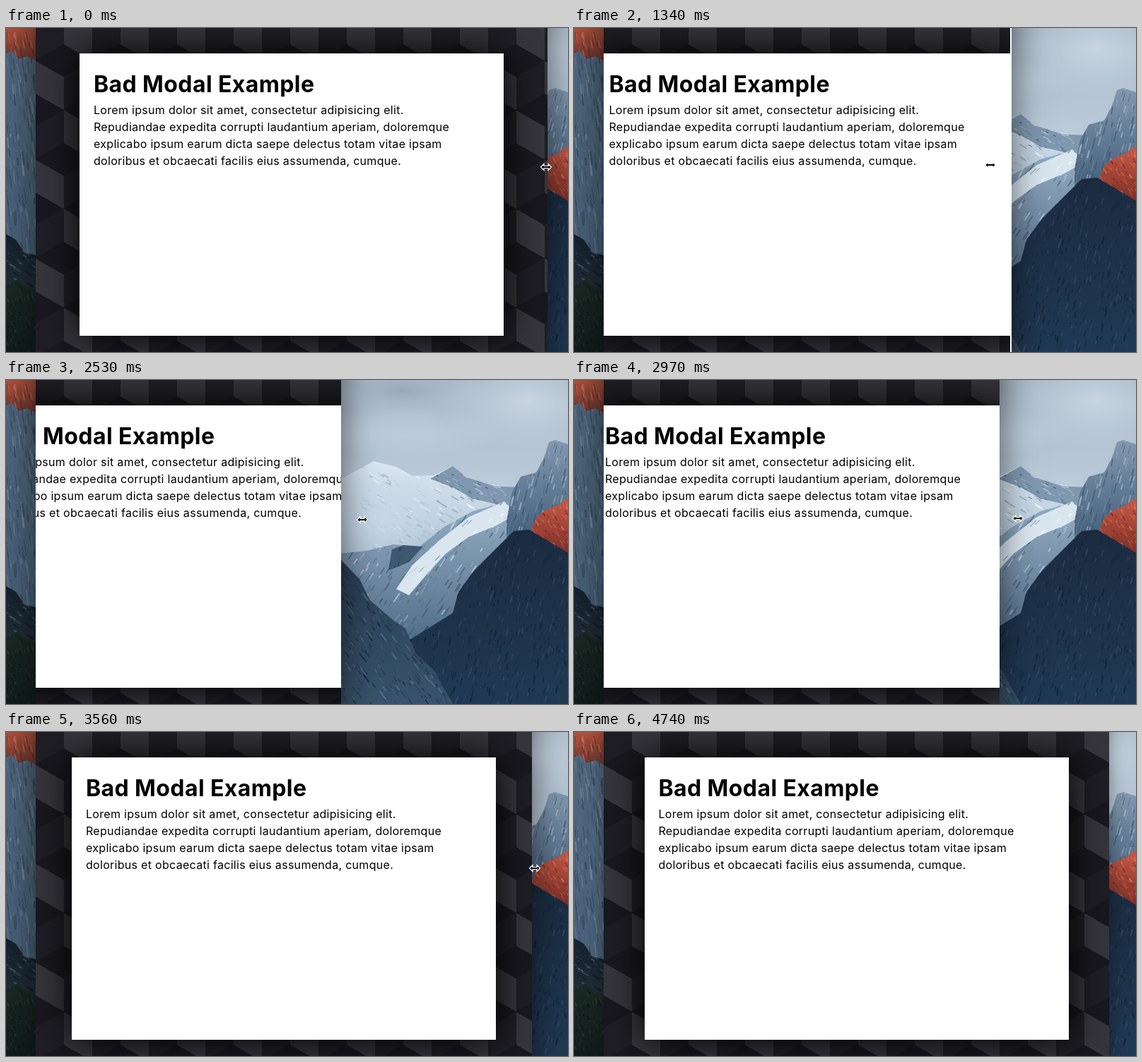
Recreate the animation shown at these times as an HTML page with a canvas. Size 795x459 px, loop 4840 ms.

```html
<!DOCTYPE html>
<html lang="en">
<head>
<meta charset="utf-8">
<title>Modal resize</title>
<style>
  html, body { margin: 0; width: 100%; height: 100%; overflow: hidden; background: #1c2a3a; }
  #stage { position: relative; width: 795px; height: 459px; overflow: hidden; }
  #scene, #cursor { position: absolute; left: 0; top: 0; }
  #win {
    position: absolute; left: 42px; top: -100px; height: 659px;
    box-shadow: 0 14px 48px rgba(0, 0, 0, .6);
  }
  #win.idle { box-shadow: 0 8px 24px rgba(0, 0, 0, .4); }
  #view { position: absolute; inset: 0; overflow: hidden; background: #fff; }
  #page {
    --edge: #445 12%, transparent 12.5%, transparent 87%, #445 87.5%, #445;
    --face: #99a 25%, transparent 25.5%, transparent 75%, #99a 75%, #99a;
    position: absolute; left: 0; top: 100px; height: 459px; overflow: hidden;
    background-color: #556;
    background-image:
      linear-gradient(rgba(0, 0, 0, .65), rgba(0, 0, 0, .65)),
      linear-gradient(30deg, var(--edge)), linear-gradient(150deg, var(--edge)),
      linear-gradient(30deg, var(--edge)), linear-gradient(150deg, var(--edge)),
      linear-gradient(60deg, var(--face)), linear-gradient(60deg, var(--face));
    background-size: 80px 140px;
    background-position: 0 -24px, 0 -24px, 0 -24px, 40px 46px, 40px 46px, 0 -24px, 40px 46px;
  }
  #modal {
    position: absolute; left: 50%; top: 36px; width: 600px; height: 400px; margin-left: -300px;
    background: #fff; color: #000; box-shadow: 0 0 50px #000;
    font: 16px/24px Inter, sans-serif; white-space: nowrap;
  }
  h1, p { position: absolute; left: 20px; margin: 0; }
  h1 { top: 24px; font-size: 32px; line-height: 40px; font-weight: 700; letter-spacing: .4px; }
  p { top: 68px; letter-spacing: .3px; }
</style>
</head>
<body>
<div id="stage">
  <canvas id="scene" width="795" height="459"></canvas>
  <div id="win">
    <div id="view">
      <div id="page">
        <div id="modal">
          <h1>Bad Modal Example</h1>
          <p>Lorem ipsum dolor sit amet, consectetur adipisicing elit.<br>
          Repudiandae expedita corrupti laudantium aperiam, doloremque<br>
          explicabo ipsum earum dicta saepe delectus totam vitae ipsam<br>
          doloribus et obcaecati facilis eius assumenda, cumque.</p>
        </div>
      </div>
    </div>
  </div>
  <svg id="cursor" width="18" height="12" viewBox="-9 -6 18 12">
    <path d="M-7.5 0L-3 -4.5V-1.5H3V-4.5L7.5 0L3 4.5V1.5H-3V4.5Z" stroke="#fff" stroke-width="1.2"/>
  </svg>
</div>
<script>
const $ = id => document.getElementById(id);
const g = $('scene').getContext('2d');

let seed = 11;
const rnd = () => (seed = seed * 16807 % 2147483647) / 2147483647;

function fade(y0, y1, top, bottom) {
  const f = g.createLinearGradient(0, y0, 0, y1);
  f.addColorStop(0, top);
  f.addColorStop(1, bottom);
  return f;
}

// Fills a path, then scatters short slanted strokes inside it.
function land(d, fill, box, colors = [], count = 0, dx = 4, dy = 8) {
  const path = new Path2D(d), [x, y, w, h] = box;
  g.save();
  g.fillStyle = fill;
  g.fill(path);
  g.clip(path);
  for (let i = 0; i < count; i++) {
    const px = x + rnd() * w, py = y + rnd() * h, k = .4 + rnd();
    g.strokeStyle = colors[i % colors.length];
    g.lineWidth = .6 + rnd() * 1.6;
    g.globalAlpha = .25 + rnd() * .45;
    g.beginPath();
    g.moveTo(px, py);
    g.lineTo(px + dx * k, py + dy * k);
    g.stroke();
  }
  g.restore();
}

function cloud(x, y, rx, ry, color) {
  g.save();
  g.translate(x, y);
  g.scale(rx, ry);
  const f = g.createRadialGradient(0, 0, 0, 0, 0, 1);
  f.addColorStop(0, color);
  f.addColorStop(1, 'rgba(200,215,228,0)');
  g.fillStyle = f;
  g.fillRect(-1, -1, 2, 2);
  g.restore();
}

function drawScene() {
  // Sky
  g.fillStyle = fade(0, 200, '#a5b5c4', '#c3d3e1');
  g.fillRect(0, 0, 795, 459);
  cloud(740, 30, 130, 70, 'rgba(208,220,230,.8)');
  cloud(560, 75, 150, 35, 'rgba(190,205,219,.8)');
  cloud(560, 15, 120, 40, 'rgba(135,153,172,.5)');

  // Snow range
  land('M430 150L478 138L520 115L552 123L575 136L605 135L632 122L652 138L680 147L722 153V330H430Z',
    fade(115, 300, '#dbe7f1', '#9db5ca'), [500, 120, 230, 120], ['#5c7893', '#fff', '#87a0b8'], 200, 8, 5);
  land('M600 140L632 122L652 138L690 150L722 152V190L690 175L660 168L632 152Z',
    '#7f98b0', [600, 122, 122, 70], ['#35516d', '#e4eef6'], 110, 7, 4);
  cloud(530, 190, 95, 65, 'rgba(200,216,230,.95)');

  // Granite slopes
  land('M430 250L510 242L548 233L585 236L620 208L660 186L690 178L722 190V330L570 380L430 300Z',
    fade(190, 365, '#8fa8bf', '#546f8a'), [430, 185, 290, 185], ['#2d4661', '#dbe7f1', '#456079'], 420, -6, 9);
  land('M552 296L575 262L612 228L655 194L705 172L722 190L694 206L655 222L622 246L598 272L570 305Z',
    '#d9e6f0', [550, 172, 172, 130], ['#fff', '#6d879f', '#3c5772'], 110, -8, 8);
  land('M541 270L546 240L562 234L590 236L570 258Z', '#3f5870', [540, 232, 50, 40], ['#253d56'], 20, -2, 9);

  // Dome
  land('M708 200L716 158L728 137L750 131L762 108L768 88L777 85L795 91V225H708Z',
    fade(85, 210, '#8299af', '#4a6580'), [708, 86, 87, 130], ['#314c67', '#b9cad8', '#6a839b'], 150, -3, 12);

  // Sunlit hill
  land('M738 225L750 195L764 184L780 178L795 167V255H738Z',
    fade(168, 245, '#c85a45', '#7d2f28'), [738, 168, 57, 80], ['#e58468', '#732a28', '#b34a3a'], 140, 4, 5);

  // Dark forest
  land('M560 375L600 350L632 330L640 300L662 270L690 242L718 214L740 212L764 226L795 245V459H560Z',
    fade(215, 459, '#1b2c40', '#203953'), [560, 212, 235, 247], ['#0d1a2a', '#35506b', '#14253a'], 620, -2, 8);

  // Near ridge
  land('M430 225L474 255L500 282L515 312L545 338L565 352L580 388L606 412L632 459H430Z',
    fade(260, 459, '#2a3f55', '#38536b'), [430, 225, 202, 234], ['#101e2e', '#6a859c', '#1a2c40'], 420, 6, 8);

  // Left cliff
  land('M0 0H42V459H0Z', fade(30, 310, '#50667d', '#4a627a'),
    [0, 30, 42, 290], ['#25384c', '#7d93a8', '#384e65'], 150, 2, 18);
  land('M0 0H42V46L30 40L18 44L8 32L0 36Z', fade(0, 45, '#b0523c', '#6d3631'),
    [0, 0, 42, 45], ['#d27a58', '#55292a', '#8e4034'], 50, 2, 9);
  land('M0 292L14 300L26 318L42 322V459H0Z', fade(295, 380, '#16232f', '#222f38'),
    [0, 292, 42, 80], ['#5d7488', '#0b141d'], 50, 8, 5);
  land('M0 366L16 356L30 368L42 372V459H0Z', fade(356, 459, '#1b2a25', '#121d1b'),
    [0, 356, 42, 103], ['#2f4032', '#0a1211'], 80, 2, 5);
}

// step, window edge, layout edge, cursor x, cursor y
const poses = [
  [0, 766, 766, 764, 197],
  [1, 755, 755, 740, 197],
  [3, 695, 696, 660, 197],
  [8, 505, 498, 482, 190],
  [10, 462, 463, 468, 194],
  [11, 474, 484, 504, 198],
  [16, 688, 688, 711, 195],
  [18, 744, 744, 748, 193],
  [20, 757, 757, 766, 192],
  [22, 757, 757, 820, 180],
  [26, 757, 757, 820, 180]
];
const LOOP = 4840, STEP = 147;

// The screen refreshes in steps, with two pauses.
function stepAt(t) {
  const count = from => Math.floor((t - from + 6) / STEP);
  if (t < 750) return 0;
  if (t < 2530) return Math.min(10, 1 + count(750));
  return Math.min(26, 11 + count(2530));
}

function poseAt(k) {
  let i = 1;
  while (poses[i][0] < k) i++;
  const a = poses[i - 1], b = poses[i], u = (k - a[0]) / (b[0] - a[0]);
  return a.map((v, n) => Math.round(v + (b[n] - v) * u));
}

function frame() {
  const k = stepAt(performance.now() % LOOP);
  const [, edge, layout, x, y] = poseAt(k);
  $('win').style.width = edge - 42 + 'px';
  $('win').className = k > 23 ? 'idle' : '';
  $('page').style.width = layout - 42 + 'px';
  $('cursor').style.transform = `translate(${x - 9}px, ${y - 6}px)`;
  requestAnimationFrame(frame);
}

drawScene();
frame();
</script>
</body>
</html>
```
